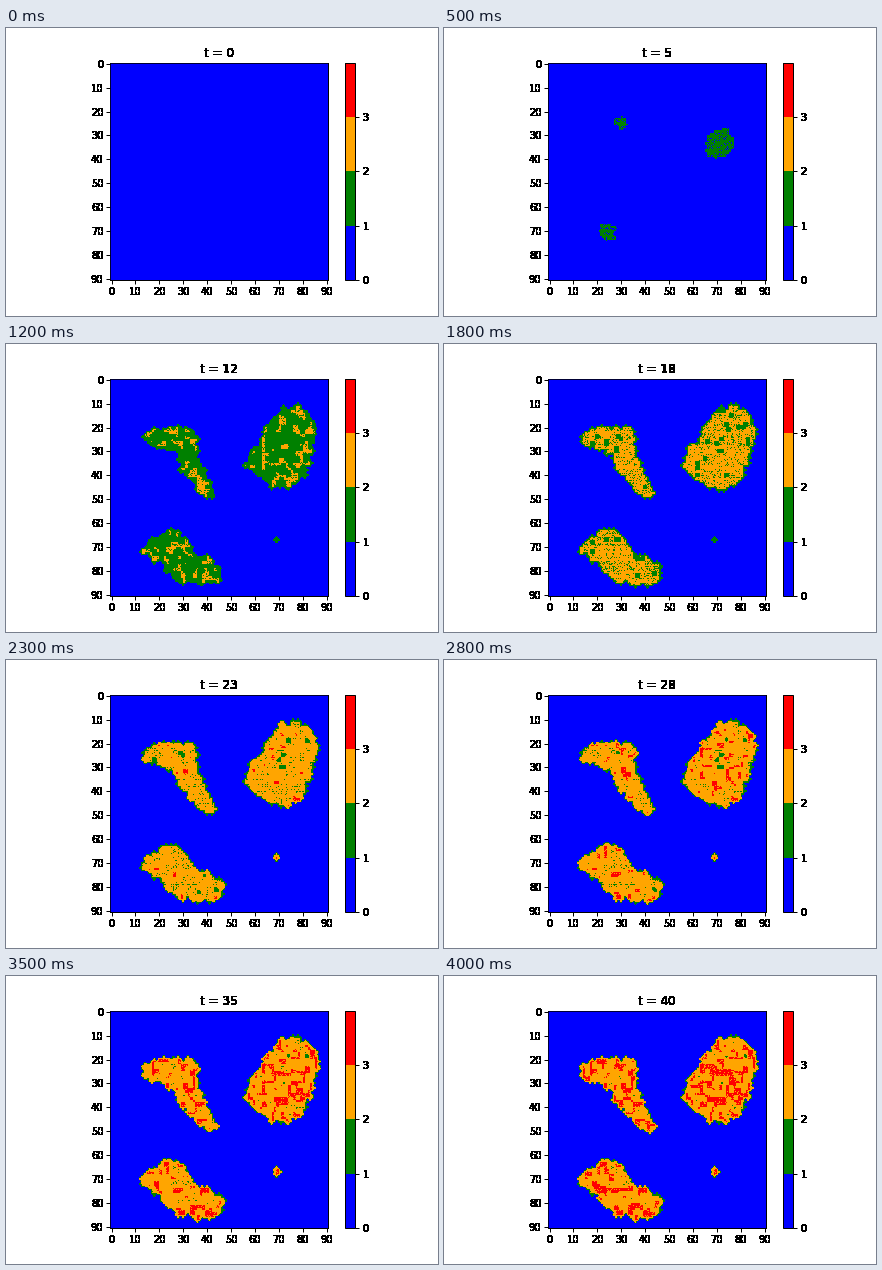
Write a matplotlib script that moves like this. It is 432 px wide and 288 px high and loops after 4100 ms.

```python
import numpy as np
import matplotlib.pyplot as plt
from matplotlib.animation import FuncAnimation
from matplotlib.colors import ListedColormap

SIZE, STEPS, PHASE = 91, 41, 10

plt.rcParams.update({
    "font.family": "DejaVu Sans", "font.size": 10, "axes.linewidth": 1,
    "xtick.major.width": 1, "ytick.major.width": 1,
    "xtick.major.size": 4, "ytick.major.size": 4,
    "xtick.major.pad": 3, "ytick.major.pad": 3,
    "figure.subplot.bottom": 0.125,
})

# Spines of the colonies as (x, y, radius); growth starts at the second point.
COLONIES = [
    [(63, 34, 6), (71, 34, 11), (76, 21, 9)],
    [(18, 25, 3.5), (30, 25, 4.5), (33, 36, 3.8), (40, 47, 2)],
    [(18, 71, 3.5), (24, 70, 6.5), (31, 78, 6.5), (42, 81, 4)],
]
STRAY_TIME, STRAY_X, STRAY_Y = 12, 69, 67

rng = np.random.default_rng(7)
rows, cols = np.mgrid[:SIZE, :SIZE]
rough = rng.normal(0, 0.5, (SIZE, SIZE))


def plus(mask):
    """Spread each marked cell to its four neighbours."""
    out = mask.copy()
    out[1:] |= mask[:-1]
    out[:-1] |= mask[1:]
    out[:, 1:] |= mask[:, :-1]
    out[:, :-1] |= mask[:, 1:]
    return out


def colony(spine, t):
    """Cells covered by discs that swell along the spine."""
    points = np.array(spine, float)
    knots = np.arange(len(points))
    along = np.linspace(0, knots[-1], 40)
    x, y, r = (np.interp(along, knots, p) for p in points.T)
    age = t / PHASE
    reach = np.hypot(x - points[1, 0], y - points[1, 1])
    radius = r * age - 2.5 * reach * (1 - age) ** 2
    dist = np.hypot(cols[..., None] - x, rows[..., None] - y)
    return plus((dist + rough[..., None] < radius).any(axis=-1))


def simulate():
    grid = np.zeros((SIZE, SIZE))
    history = [grid.copy()]
    for t in range(1, STEPS):
        level = min(3, 1 + (t - 1) // PHASE)
        if level == 1:
            fresh = np.any([colony(c, t) for c in COLONIES], axis=0)
        else:
            rate = np.interp(t, [11, 20, 21], [0.09, 0.35, 0.017])
            picked = (grid > 0) & (grid < level) & (rng.random(grid.shape) < rate)
            if t == STRAY_TIME:
                picked[STRAY_Y, STRAY_X] = True
            fresh = plus(picked)
        grid = np.maximum(grid, level * fresh)
        history.append(grid)
    return history


def hard_edges(img, dpi):
    """Make every touched pixel of a text solid."""
    out = np.zeros_like(img)
    out[..., 3] = img[..., 3] > 0
    return out, 0, 0


history = simulate()

fig, ax = plt.subplots(figsize=(6, 4), dpi=72)
cmap = ListedColormap(["blue", "green", "orange", "red"])
im = ax.imshow(history[0], cmap=cmap, vmin=0, vmax=4,
               interpolation="antialiased", interpolation_stage="data")
ax.set_xticks(range(0, SIZE, 10))
ax.set_yticks(range(0, SIZE, 10))
ax.spines[["left", "top"]].set_linewidth(0.8)
bar = fig.colorbar(im, ticks=range(4))
title = ax.set_title("t = 0")

labels = ax.get_xticklabels() + ax.get_yticklabels() + bar.ax.get_yticklabels()
for text in labels + [title]:
    text.set_agg_filter(hard_edges)


def update(t):
    im.set_data(history[t])
    title.set_text(f"t = {t}")
    return im, title


anim = FuncAnimation(fig, update, frames=STEPS, interval=100, repeat=True)
plt.show()
```
